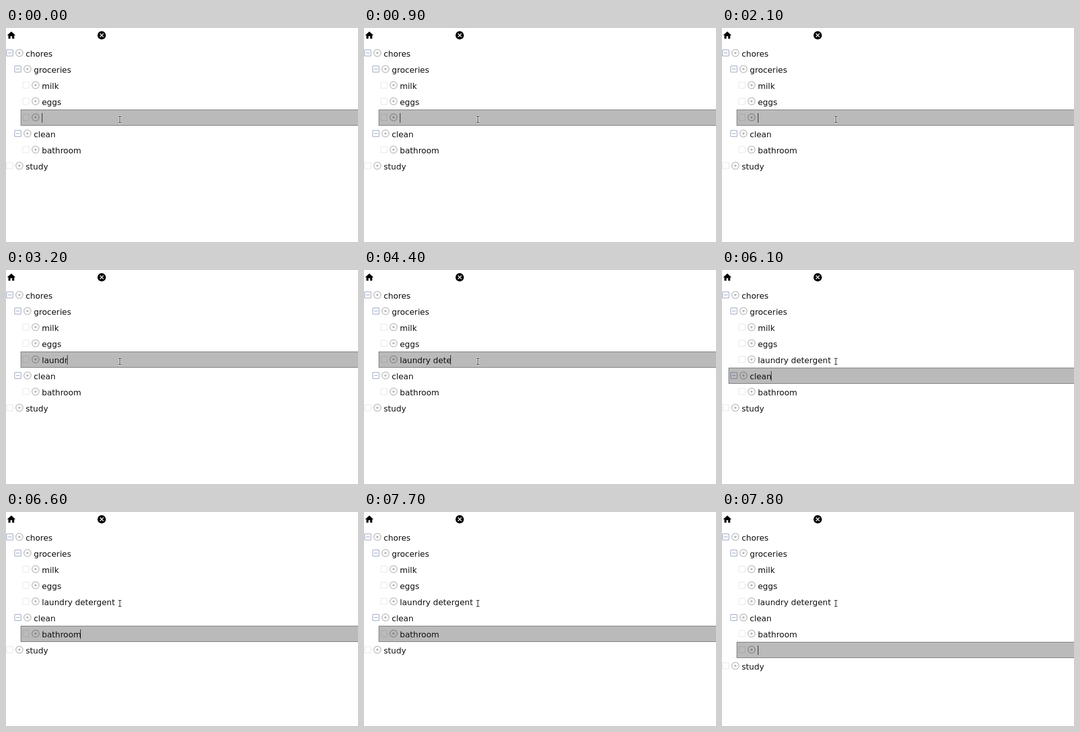
Animation, 697 px wide and 425 px high, one loop 8 s. Source, as an HTML page with a canvas:

```html
<!DOCTYPE html>
<html lang="en">
<head>
<meta charset="utf-8">
<title>Outline</title>
<style>
  html, body { margin: 0; width: 100%; height: 100%; overflow: hidden; background: #fff; }
  canvas { display: block; }
</style>
</head>
<body>
<canvas id="stage" width="697" height="425"></canvas>
<script>
const ctx = document.getElementById('stage').getContext('2d');
const LOOP = 8000, ROW = 32, INDENT = 16, BLINK = 600, KEY_DELAY = 100;
const GRAY = 'rgba(0,0,0,.27)', BLUE = 'rgba(30,60,120,.44)', FAINT = 'rgba(0,0,0,.09)';

// Bursts of typing by start time; letters within a burst follow at KEY_DELAY.
const BURSTS = {
  2300: 'laun', 3000: 'd', 3200: 'r', 3600: 'y ',
  4000: 'de', 4300: 'ter', 5000: 'gen', 5500: 't'
};
const KEYS = Object.entries(BURSTS).flatMap(([time, letters]) =>
  [...letters].map((letter, i) => ({ letter, time: +time + i * KEY_DELAY })));
// Each step moves the focus one row down; the last one inserts that row.
const STEPS = [6100, 6600, 7800];

function line(color, width, ...points) {
  ctx.strokeStyle = color;
  ctx.lineWidth = width;
  ctx.beginPath();
  points.forEach(([x, y]) => ctx.lineTo(x, y));
  ctx.stroke();
}

function disc(x, y, r, color) {
  ctx.fillStyle = color;
  ctx.beginPath();
  ctx.arc(x, y, r, 0, 7);
  ctx.fill();
}

function ring(x, y, r, color) {
  ctx.strokeStyle = color;
  ctx.lineWidth = 1.6;
  ctx.beginPath();
  ctx.arc(x, y, r, 0, 7);
  ctx.stroke();
}

function box(x, y, color) {
  ctx.strokeStyle = color;
  ctx.lineWidth = 1.3;
  ctx.beginPath();
  ctx.roundRect(x - 6.2, y - 6.2, 12.4, 12.4, 1);
  ctx.stroke();
}

function toolbar() {
  ctx.fillStyle = '#000';
  ctx.fill(new Path2D('M8.8 21.2V16.2H12.2V21.2H16.3V14.5H18.8L10.5 7L2.2 14.5H4.7V21.2Z'));
  const x = 189.5, y = 14.5, arm = 3.5;
  disc(x, y, 8.3, '#000');
  for (const s of [-1, 1]) line('#fff', 1.7, [x - arm, y - s * arm], [x + arm, y + s * arm]);
}

function drawRow([level, label, open], index, focused, caretOn) {
  const x = 7.5 + level * INDENT, y = 49.5 + index * ROW, textX = x + 31.5;
  if (focused) {
    ctx.fillStyle = '#bababa';
    ctx.fillRect(x - 10.5, y - 15.5, 720, ROW);
    ctx.strokeStyle = '#6a6a6a';
    ctx.lineWidth = 1;
    ctx.strokeRect(x - 10, y - 15, 720, ROW - 1);
  }
  box(x, y, open ? BLUE : FAINT);
  if (open) line(BLUE, 1.3, [x - 3.5, y], [x + 3.5, y]);
  ring(x + 19, y, 7, GRAY);
  disc(x + 19, y, 2.2, GRAY);
  ctx.fillStyle = '#111';
  ctx.fillText(label, textX, y + 7.5);
  if (focused && caretOn) {
    const advance = Math.max(0, ctx.measureText(label).width - 1);
    ctx.fillRect(Math.floor(textX + advance), y - 8.5, 1, 19);
  }
}

function pointer() {
  const x = 225.5, top = 175.5, bottom = 187.5;
  for (const [color, width] of [['#fff', 3], ['#000', 1]]) {
    line(color, width, [x, top], [x, bottom]);
    for (const y of [top, bottom]) line(color, width, [x - 3, y], [x + 3, y]);
  }
}

function draw(t) {
  const typed = KEYS.filter(key => key.time <= t);
  const steps = STEPS.filter(time => time <= t);
  const lastAction = Math.max(-300, ...typed.map(key => key.time), ...steps);
  const caretOn = Math.floor((t - lastAction) / BLINK) % 2 === 0;
  const focus = 4 + steps.length;
  const rows = [
    [0, 'chores', true],
    [1, 'groceries', true],
    [2, 'milk'],
    [2, 'eggs'],
    [2, typed.map(key => key.letter).join('')],
    [1, 'clean', true],
    [2, 'bathroom'],
    [0, 'study']
  ];
  if (steps.length === STEPS.length) rows.splice(focus, 0, [2, '']);

  ctx.fillStyle = '#fff';
  ctx.fillRect(0, 0, 697, 425);
  ctx.font = '16px "DejaVu Sans", sans-serif';
  toolbar();
  rows.forEach((row, i) => drawRow(row, i, i === focus, caretOn));
  pointer();
}

const start = performance.now();
function tick() {
  draw((performance.now() - start) % LOOP);
  requestAnimationFrame(tick);
}
tick();
</script>
</body>
</html>
```
